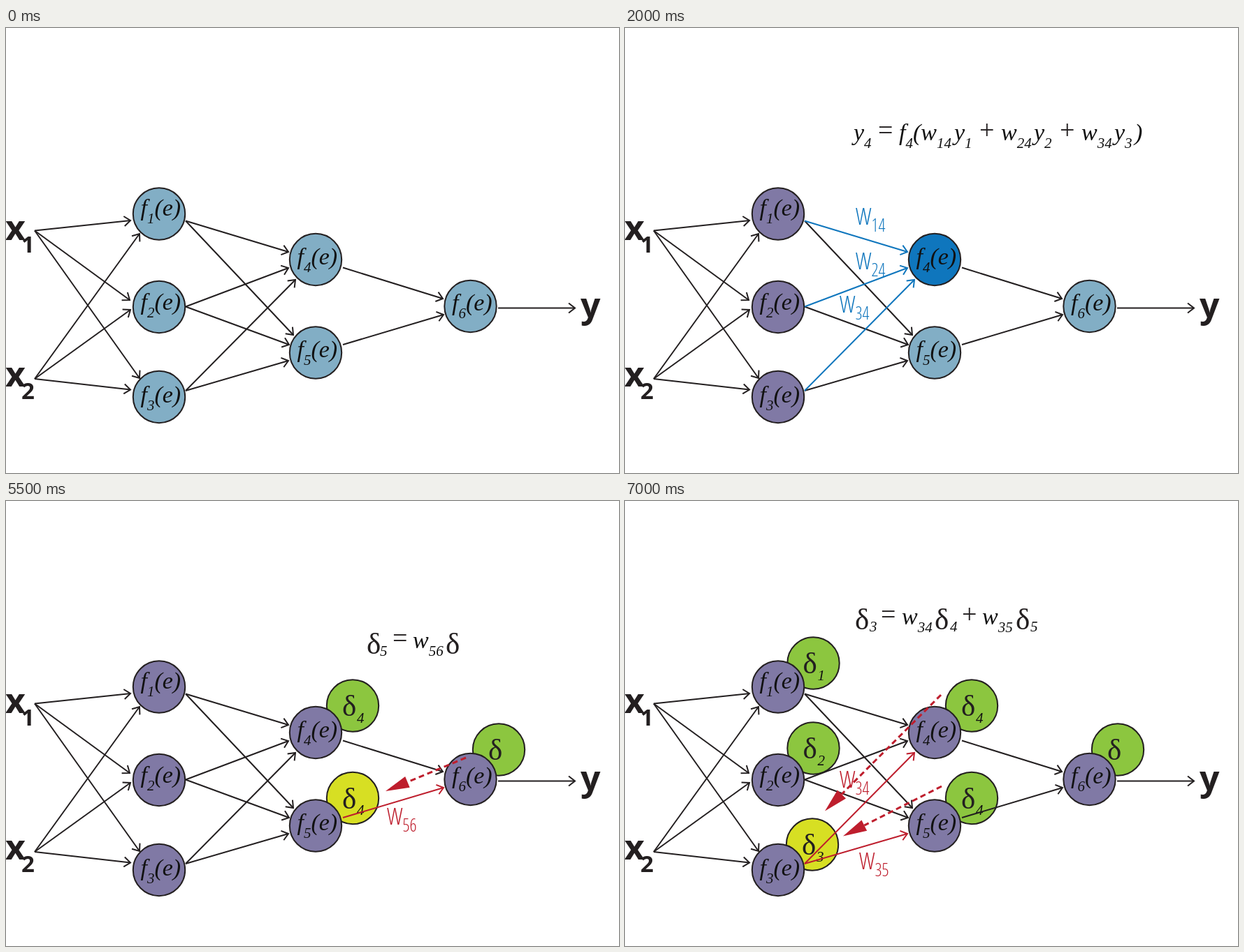
Recreate the animation shown at these times as an HTML page. Size 877 by 638 pixels, loop 8 s.

```html
<!DOCTYPE html>
<html lang="en">
<head>
<meta charset="utf-8">
<title>Neural network training</title>
<style>
html, body { margin: 0; width: 100%; height: 100%; overflow: hidden; background: #fff; }
svg { display: block; width: 877px; height: 638px; }
text { fill: #231f20; white-space: pre; }
.math { font: italic 34px "Liberation Serif", serif; fill: #111; }
.math .sub { font-size: 21px; }
.op { font: 38px "Liberation Serif", serif; }
.delta { font: 43px "Liberation Serif", serif; }
.name { font: 700 50px "Open Sans", "Noto Sans", sans-serif; font-stretch: 62.5%; }
.name .sub { font-size: 33px; }
.weight { font: 300 33px "Open Sans", "Noto Sans", sans-serif; font-stretch: 62.5%; }
.weight .sub { font-size: 25px; }
</style>
</head>
<body>
<svg id="stage" viewBox="0 0 877 638"></svg>
<script>
const INK = '#231f20', IDLE = '#82aec5', DONE = '#8079a5', BLUE = '#0f76bd',
      GREEN = '#8cc63f', YELLOW = '#d7df23', RED = '#be1e2d';

// centre x, centre y, text baseline
const nodes = [[219, 266.5, 269], [219, 400, 404], [219, 529, 537],
               [443, 332, 339], [443, 465.5, 472], [664.5, 399, 405]];
// centre x, centre y, subscript
const deltas = [[269.5, 232.5, 1], [269.5, 354.5, 2], [268, 492.5, 3],
                [496, 293.5, 4], [496, 426, 4], [705, 356.5, '']];
const starts = { a: [41, 290.5], b: [41, 503], 1: [257, 276.5], 2: [257, 399.5],
                 3: [257, 520], 4: [482, 343.5], 5: [482, 454], 6: [704, 401.5] };
const ends = { a1: [178, 276], a2: [177, 390], a3: [191, 502], b1: [191, 295],
               b2: [178, 404], b3: [178, 518.5], 14: [404, 321], 15: [411, 440],
               24: [404, 344], 25: [405, 454], 34: [414, 361], 35: [404, 477],
               46: [625, 388], 56: [626, 411], '6y': [814, 401.5] };

// Underscores switch between normal text and subscript.
function rich(cls, x, y, str, drop, color) {
  const spans = str.split('_').map((part, i) => part &&
    `<tspan ${i ? `dy="${i % 2 ? drop : -drop}"` : ''} ${i % 2 ? 'class="sub"' : ''}>${part}</tspan>`);
  return `<text class="${cls}" x="${x}" y="${y}" ${color ? `style="fill:${color}"` : ''}>${spans.join('')}</text>`;
}
const math = (x, y, str) => rich('math', x, y, str, 11);
const weight = (x, y, sub, color) => rich('weight', x, y, `W_${sub}`, 9.5, color);
const op = (x, y, sign) => `<text class="op" x="${x}" y="${y - 2}">${sign}</text>`;
const delta = (x, y) => `<text class="delta" x="${x}" y="${y}">δ</text>`;

const circle = ([x, y], fill) =>
  `<circle cx="${x}" cy="${y}" r="37.2" fill="${fill}" stroke="${INK}" stroke-width="2"/>`;

// Open-headed arrow through the given points.
function arrow(points, color = INK, width = 2, length = 9, half = 7) {
  const [[px, py], [x, y]] = points.slice(-2);
  const angle = Math.atan2(y - py, x - px) * 180 / Math.PI;
  return `<g fill="none" stroke="${color}" stroke-width="${width}"><polyline points="${points}"/>
    <path transform="translate(${x} ${y}) rotate(${angle})" d="M${-length} ${-half}L0 0L${-length} ${half}"/></g>`;
}

// Dashed arrow with a solid head.
function dashed(x1, y1, x2, y2) {
  const angle = Math.atan2(y2 - y1, x2 - x1) * 180 / Math.PI;
  const length = Math.hypot(x2 - x1, y2 - y1);
  return `<g transform="translate(${x1} ${y1}) rotate(${angle})">
    <path d="M0 0H${length - 34}" stroke="${RED}" stroke-width="3" stroke-dasharray="8 5"/>
    <path d="M${length} 0l-34 -8.5v17z" fill="${RED}"/></g>`;
}

const inputFormula = k =>
  math(394, 161, `y_${k}`) + op(429, 161, '=') + math(460, 161, `f_${k}_(w_(x1)${k}`) +
  math(561, 161, 'x_1') + op(597, 161, '+') + math(628, 161, `w_(x2)${k}`) +
  math(697, 161, 'x_2') + math(727, 161, ')');

const hiddenFormula = k =>
  math(327, 161, `y_${k}`) + op(362, 161, '=') + math(392, 161, `f_${k}_(w_1${k}`) +
  math(471, 161, 'y_1') + op(507, 161, '+') + math(538, 161, `w_2${k}`) +
  math(585, 161, 'y_2') + op(622, 161, '+') + math(653, 161, `w_3${k}`) +
  math(700, 161, 'y_3') + math(729, 161, ')');

const outputFormula =
  math(398, 255, 'y') + op(420, 255, '=') + math(451, 255, 'f_6_(w_46') +
  math(529, 255, 'y_4') + op(566, 255, '+') + math(596, 255, 'w_56') +
  math(643, 255, 'y_5') + math(677, 255, ')');

const errorFormula = delta(597, 307) + op(625, 300, '=') +
  math(654, 299, 'z') + math(677, 299, '-') + math(695, 299, 'y');

const lastDelta = k => delta(516, 219) + math(535, 211, `_${k}`) + op(553, 211, '=') +
  math(582, 211, `w_${k}6`) + delta(629, 219);

const backFormula = k => delta(329, 184) + math(350, 176, `_${k}`) + op(366, 177, '=') +
  math(396, 177, `w_${k}4`) + delta(443, 184) + math(465, 176, '_4') + op(482, 177, '+') +
  math(511, 177, `w_${k}5`) + delta(559, 184) + math(580, 176, '_5');

const inputStep = (k, shown) => ({
  done: k - 1, active: k, edges: ['a' + k, 'b' + k],
  extra: inputFormula(shown) + weight(101, 321, `(x1)${k}`, BLUE) + weight(105, 493, `(x2)${k}`, BLUE)
});
const hiddenStep = (k, places) => ({
  done: k - 1, active: k, edges: [1, 2, 3].map(i => `${i}${k}`),
  extra: hiddenFormula(k) + places.map(([x, y], i) => weight(x, y, `${i + 1}${k}`, BLUE)).join('')
});
const backStep = (k, shown, edges, extra) =>
  ({ done: 6, deltas: shown, current: k, edges, color: RED, extra });

const errorMarks = delta(690, 370) + '<text class="op" x="714" y="347" style="font-size:27px">+</text>' +
  '<text class="op" x="717" y="379" style="font-size:27px">-</text>';

const steps = [
  [0, { done: 0 }],
  [500, inputStep(1, 1)],
  [1000, inputStep(2, 3)],
  [1500, inputStep(3, 2)],
  [2000, hiddenStep(4, [[330, 282], [330, 346], [307, 408]])],
  [2500, hiddenStep(5, [[330, 346], [307, 411], [300, 484]])],
  [3000, { done: 5, active: 6, edges: ['46', '56'],
    extra: outputFormula + weight(519, 347, '46', BLUE) + weight(519, 412, '56', BLUE) }],
  [4500, { done: 6, deltas: [6], compare: true, extra: errorFormula }],
  [5000, backStep(4, [4, 6], ['46'],
    lastDelta(4) + weight(519, 347, '46', RED) + dashed(658, 345, 543, 306))],
  [5500, backStep(5, [4, 5, 6], ['56'],
    lastDelta(5) + weight(545, 464, '56', RED) + dashed(658, 368, 543, 416))],
  [6000, { ...backStep(1, [1, 4, 5, 6], ['14', '15'],
    backFormula(1) + weight(359, 297, '14', RED) + weight(331, 349, '15', RED) +
    dashed(450, 268.5, 316, 231.5) + dashed(453, 410.5, 307, 263.5)), shift: 0.8 }],
  [6500, backStep(2, [1, 2, 4, 5, 6], ['24', '25'],
    backFormula(2) + weight(330, 346, '24', RED) + weight(307, 450, '25', RED) +
    dashed(451, 297, 317, 344) + dashed(453, 410, 317, 368))],
  [7000, backStep(3, [1, 2, 3, 4, 5, 6], ['34', '35'],
    backFormula(3) + weight(307, 411, '34', RED) + weight(335, 528, '35', RED) +
    dashed(452, 278, 286, 444.5) + dashed(453, 409, 312, 480.5))]
];

function deltaNode(k, s) {
  const [x, y, sub] = deltas[k - 1];
  const label = s.compare ? errorMarks : delta(x - 15, y + 14.5) + math(x + 6, y + 13, `_${sub}`);
  return circle([x, y], k === s.current ? YELLOW : GREEN) + label;
}

function render(s) {
  const marked = s.edges || [];
  const edges = Object.entries(ends)
    .filter(([id]) => !(s.compare && id === '6y'))
    .sort(([a], [b]) => marked.includes(a) - marked.includes(b))
    .map(([id, end]) => arrow([starts[id[0]], end], marked.includes(id) ? s.color || BLUE : INK));
  const balls = nodes.map(([x, y, base], i) => {
    const fill = i + 1 === s.active ? BLUE : i < s.done ? DONE : IDLE;
    return circle([x, y], fill) + math(x - 26.5, base, `f_${i + 1}_(e)`);
  });
  const compare = s.compare ? rich('name', 822, 350, 'z', 0, GREEN) +
    [[[704, 401.5], [814, 401.5]], [[813, 332], [750, 332]], [[776, 401], [776, 374.5], [750, 374.5]]]
      .map(points => arrow(points, GREEN, 4, 17, 14)).join('') : '';
  return `<g transform="translate(0 ${s.shift || 0})">` +
    rich('name', -1, 304, 'x', 0) + rich('name', 22, 304, '_1', 18) +
    rich('name', -1, 514, 'x', 0) + rich('name', 22, 514, '_2', 18) +
    rich('name', 822, 415, 'y', 0, s.compare && GREEN) +
    (s.deltas || []).map(k => deltaNode(k, s)).join('') +
    compare + edges.join('') + balls.join('') + (s.extra || '') + '</g>';
}

const stage = document.getElementById('stage');
const origin = performance.now();
let shown;
function tick() {
  const time = (performance.now() - origin) % 8000;
  const step = steps.findLast(([start]) => start <= time)[1];
  if (step !== shown) stage.innerHTML = render(shown = step);
  requestAnimationFrame(tick);
}
tick();
</script>
</body>
</html>
```
